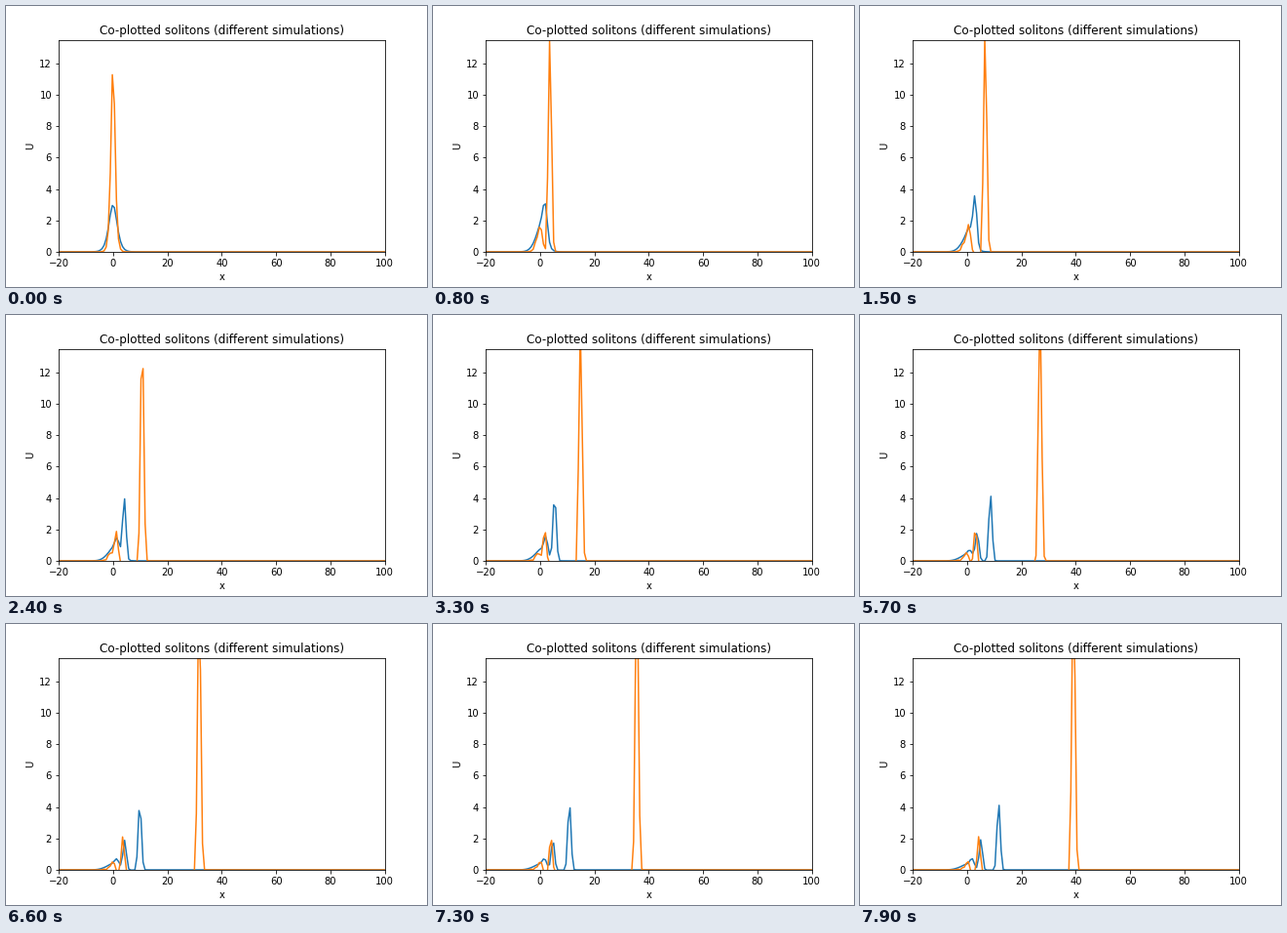
Animation, 432 px wide and 288 px high, one loop 8000 ms. Source, as a matplotlib script:

```python
import numpy as np
import matplotlib.pyplot as plt
from matplotlib.animation import FuncAnimation

FRAMES = 80
INTERVAL = 100      # ms
STEPS = 40          # Euler steps per frame
DT = 0.1 / STEPS

x = np.linspace(-50, 100, 200)
dx = x[1] - x[0]


def soliton(c):
    return 3 * c / np.cosh(np.sqrt(c) / 2 * x) ** 2


def step(u):
    """Euler step of u_t + u u_x = 0 with a three-point average of u."""
    right, left = np.roll(u, -1), np.roll(u, 1)
    return u - DT * (right + u + left) * (right - left) / (6 * dx)


def simulate(c):
    u = soliton(c)
    history = [u]
    for _ in range(FRAMES - 1):
        for _ in range(STEPS):
            u = step(u)
        history.append(u)
    return history


runs = [simulate(c) for c in (1, 4)]

fig, ax = plt.subplots(figsize=(6, 4), dpi=72)
fig.subplots_adjust(left=0.125, right=0.9, bottom=0.125, top=0.88)
ax.set_xlim(-20, 100)
ax.set_ylim(0, 13.5)
ax.set_xlabel("x")
ax.set_ylabel("U")
ax.set_title("Co-plotted solitons (different simulations)")
lines = [ax.plot(x, run[0], color=color, lw=1.5)[0]
         for run, color in zip(runs, ("C0", "C1"))]


def update(i):
    for line, run in zip(lines, runs):
        line.set_ydata(run[i])
    return lines


anim = FuncAnimation(fig, update, frames=FRAMES, interval=INTERVAL,
                     repeat=True, repeat_delay=0)
plt.show()
```
